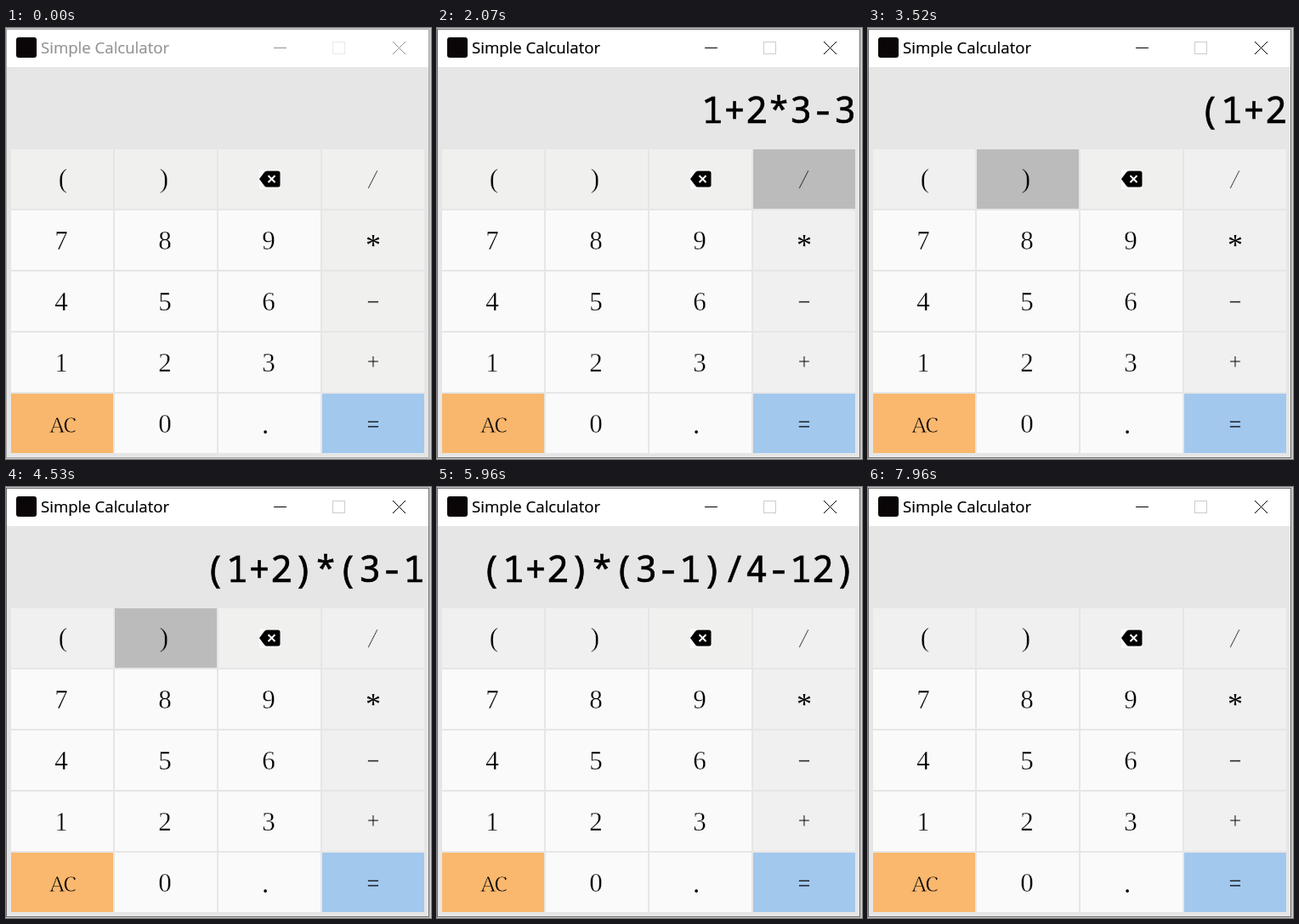
Write an HTML page that moves like this. It is 500 by 508 pixels and loops after 8.46 s.

```html
<!DOCTYPE html>
<html lang="en">
<head>
<meta charset="utf-8">
<title>Simple Calculator</title>
<style>
  html, body { margin: 0; width: 100%; height: 100%; overflow: hidden; background: #c8c8c8; }
  svg { display: block; width: 500px; height: 508px; }
  .title { font: 18.6px "Open Sans", "Noto Sans", sans-serif; stroke: #000; stroke-width: .2; }
  .display { font: 43.33px "Noto Sans Mono", monospace; text-anchor: end; white-space: pre;
    stroke: #000; stroke-width: .6; }
  .key rect { fill: currentColor; }
  /* a stroke in the key's own colour thins the glyphs */
  .key text { font: 31px "Liberation Serif", serif; text-anchor: middle;
    stroke: currentColor; stroke-width: .4; }
  .key .thin { font: 29px "Noto Sans Mono", monospace; stroke-width: 1.1; }
  .key .slash { font-style: italic; stroke-width: .7; }
  .key .star { font-size: 36px; stroke: none; }
  .key .dot { stroke: none; }
  .key .narrow { font: 26px "Noto Serif", serif; letter-spacing: -2px; stroke-width: .8; }
  .line { fill: none; stroke: #000; }
</style>
</head>
<body>
<svg viewBox="0 0 500 508">
  <rect y="1" width="498" height="506" fill="#fff"/>
  <rect x="1" y="46" width="496" height="460" fill="#e6e6e6"/>
  <rect id="edge" x=".5" y="1.5" width="497" height="505" fill="none" stroke="#6c6c6c"/>
  <rect x="12" y="11" width="24" height="24" rx="3" fill="#0a0506"/>
  <g id="caption">
    <text class="title" x="41" y="30">Simple Calculator</text>
    <path class="line" d="M315 23.5h15M455 16l15 15m0-15l-15 15"/>
    <rect class="line" x="384.5" y="16.5" width="14" height="14" style="stroke:#ccc"/>
  </g>
  <text id="display" class="display" x="493" y="112"></text>
  <g id="keys"></g>
</svg>
<script>
const LOOP = 8460;
const ROWS = ["( ) DEL /", "7 8 9 *", "4 5 6 -", "1 2 3 +", "AC 0 . ="];
const DOWN = "#bbb";

// key, pressed at, released at; "=" comes from the keyboard and shows no press
const PRESSES = [
  ["1", 680, 710], ["+", 940, 970], ["2", 1120, 1170], ["*", 1370, 1400],
  ["3", 1500, 1530], ["-", 1670, 1700], ["3", 1810, 1840], ["/", 2070, 2120],
  ["4", 2120, 2150], ["=", 2330, 2330, "6.25"], ["AC", 2680, 2710],
  ["(", 2940, 2970], ["1", 3050, 3080], ["+", 3260, 3290], ["2", 3380, 3410],
  [")", 3520, 3550], ["*", 3650, 3680], ["(", 3830, 3880], ["3", 4110, 4140],
  ["-", 4170, 4220], ["1", 4220, 4250], [")", 4530, 4560], ["/", 4810, 4840],
  ["4", 4840, 4870], ["-", 5450, 5480], ["1", 5550, 5580], ["2", 5670, 5700],
  [")", 5930, 5960], ["DEL", 6340, 6370], ["=", 6800, 6800, "-10.5"],
  ["DEL", 7500, 7530], ["DEL", 7580, 7610], ["DEL", 7650, 7680],
  ["DEL", 7720, 7750], ["DEL", 7930, 7960]
];

// class, x, baseline and optional glyph for the signs
const DIGIT = ["", 59, 45.5];
const SIGNS = {
  "(": ["", 61, 44.5], ")": ["", 58, 44.5], ".": ["dot", 55, 46.5],
  "+": ["thin", 60, 45], "-": ["thin", 60, 45.5, "\u2212"], "=": ["thin", 60, 45.5],
  "/": ["slash", 59, 45.5], "*": ["star", 60, 53], "AC": ["narrow", 60, 45.5]
};
const BACKSPACE = `<path d="M48 24h25v23h-25z" fill="#fafafa"/>
  <path d="M48 35l6-8q1-1.5 3-1.5h13q2.5 0 2.5 2.5v14q0 2.5-2.5 2.5h-13q-2 0-3-1.5z"/>
  <path d="M58.5 31l8 8m0-8l-8 8" stroke="#fff" stroke-width="2"/>`;

const $ = id => document.getElementById(id);
const keys = {};

function face(key) {
  if (key === "DEL") return BACKSPACE;
  const [cls, x, y, glyph] = SIGNS[key] || DIGIT;
  return `<text class="${cls}" x="${x}" y="${y}">${glyph || key}</text>`;
}

function restColour(key, used) {
  if (key === "AC") return used ? "#f9b86e" : "#f8b76d";
  if (key === "=") return "#a2c8ee";
  if (/^[\d.]$/.test(key)) return "#fafafa";
  return used ? "#f0f0f0" : "#f0f0ee";
}

ROWS.forEach((row, r) => row.split(" ").forEach((key, c) => {
  const g = document.createElementNS("http://www.w3.org/2000/svg", "g");
  g.setAttribute("class", "key");
  g.setAttribute("transform", `translate(${6 + c * 122} ${143 + r * 72})`);
  g.innerHTML = `<rect width="120" height="70"/>` + face(key);
  $("keys").append(g);
  keys[key] = g;
}));

function apply(text, key, result) {
  if (key === "AC") return "";
  if (key === "DEL") return text.slice(0, -1);
  return key === "=" ? result : text + key;
}

function render(t) {
  let text = "", held = "";
  const used = new Set();
  for (const [key, down, up, result] of PRESSES) {
    if (t < down) break;
    used.add(key);
    if (t < up) held = key;
    else text = apply(text, key, result);
  }
  $("display").textContent = text;
  for (const key in keys)
    keys[key].style.color = key === held ? DOWN : restColour(key, used.has(key));

  // the window gains focus
  const focus = Math.min(1, Math.max(0, (t - 130) / 300));
  $("caption").setAttribute("opacity", 0.42 + 0.58 * focus);
  $("edge").setAttribute("stroke-opacity", 0.6 + 0.4 * focus);
}

const start = performance.now();
function tick() {
  render((performance.now() - start) % LOOP);
  requestAnimationFrame(tick);
}
tick();
</script>
</body>
</html>
```
